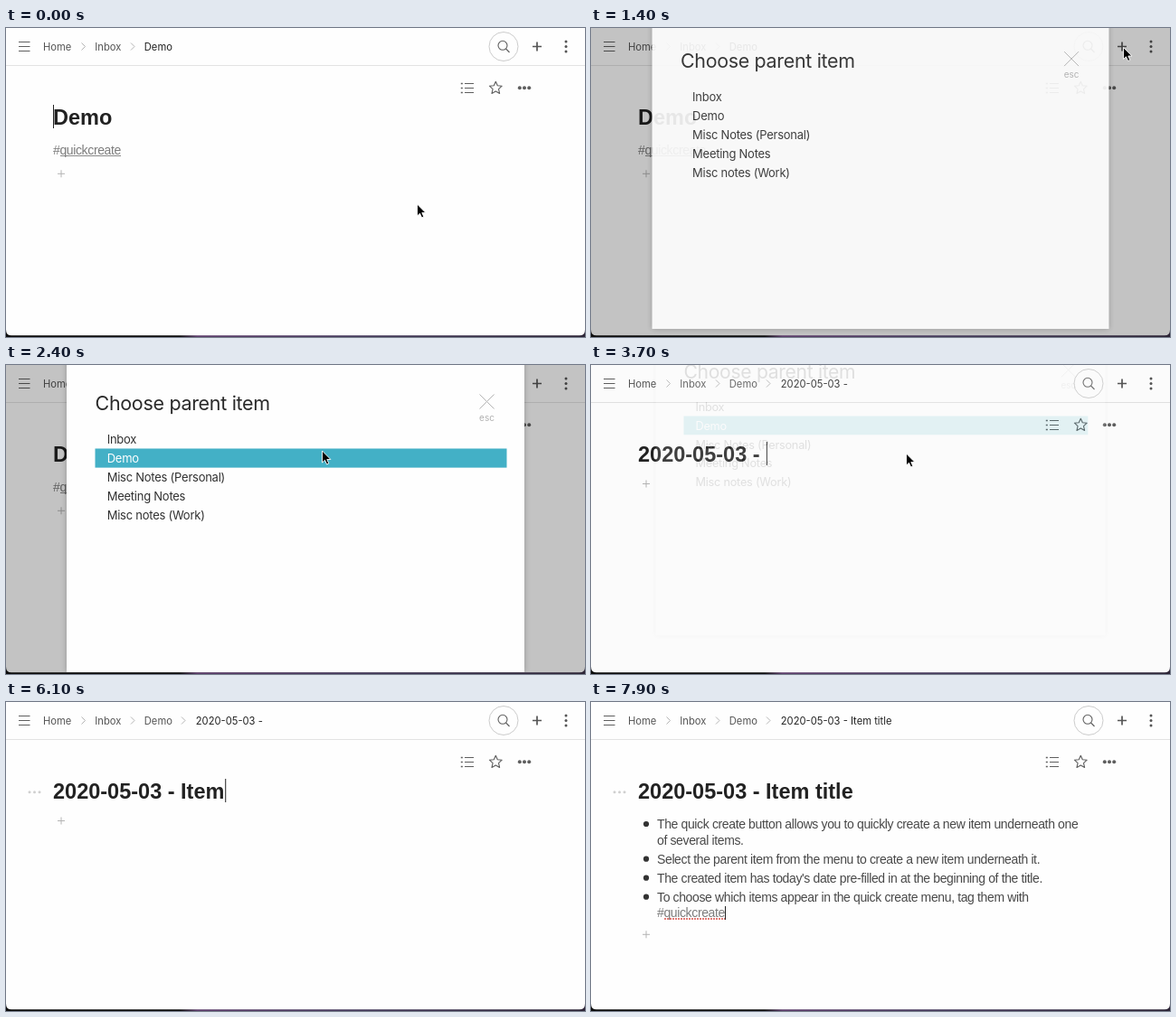
These frames come from a looping animation (640 px wide and 342 px high, 8000 ms). An HTML page:

```html
<!DOCTYPE html>
<html lang="en">
<head>
<meta charset="utf-8">
<title>Quick create</title>
<style>
  html, body { margin: 0; width: 100%; height: 100%; overflow: hidden; background: #fefefe; }
  svg { display: block; width: 640px; height: 342px; overflow: hidden; }
  text { white-space: pre; }
  .ui { font-family: Inter, Roboto, sans-serif; }
  .crumb { font-size: 11.2px; fill: #555; }
  .now { fill: #222; }
  .title { font: bold 23.5px "Liberation Sans", Arial, sans-serif; fill: #222; }
  .body { font: 14px "Liberation Sans", Arial, sans-serif; letter-spacing: -.37px; fill: #484848; }
  .tag { fill: #7c7c7c; }
  .head { font-size: 21.5px; letter-spacing: -.32px; fill: #2a2a2a; }
  .item { font-size: 13px; letter-spacing: -.25px; fill: #303030; }
  .line { fill: none; stroke: #5e5e5e; stroke-width: 1.1; }
  .soft { fill: none; stroke: #b4b4b4; stroke-width: 1; }
  .ring { fill: none; stroke: #ccc; stroke-width: 1; }
  .caret { stroke: #222; stroke-width: 1; }
</style>
</head>
<body>
<svg viewBox="0 0 640 342">
  <defs>
    <linearGradient id="dock">
      <stop offset=".3" stop-color="#0c0c0c"/>
      <stop offset=".33" stop-color="#5c3c6a"/>
      <stop offset=".6" stop-color="#453a5c"/>
      <stop offset="1" stop-color="#2c2436"/>
    </linearGradient>
    <filter id="blur" x="-5%" y="-5%" width="110%" height="110%"><feGaussianBlur stdDeviation="3"/></filter>
  </defs>
  <rect width="640" height="342" fill="#fefefe"/>

  <g id="bar" class="ui">
    <path class="line" d="M14 15.5H26.5M14 20.5H26.5M14 25.5H26.5"/>
    <text class="crumb" x="41" y="24.5">Home</text>
    <text class="crumb" x="98.3" y="24.5">Inbox</text>
    <text class="crumb" id="demoCrumb" x="152.8" y="24.5">Demo</text>
    <path class="soft" d="M83.5 16.5l4 4-4 4M138 16.5l4 4-4 4"/>
    <circle cx="550" cy="20.5" r="16" class="ring"/>
    <circle cx="549" cy="19.3" r="5" class="line"/>
    <path class="line" d="M552.6 23L556.5 27"/>
    <circle id="hover" cx="587.2" cy="20.5" r="15.7" fill="#dedede"/>
    <path d="M582 20.5h10M587 15.5v10" stroke="#555" stroke-width="1.7"/>
    <g id="kebab" fill="#555"></g>
    <path d="M0 41.5H640" stroke="#e2e2e2"/>
  </g>

  <g id="tools">
    <path class="line" d="M507 61.5h10M507 66.5h10M507 71.5h10"/>
    <path class="line" d="M502.8 61.5h2M502.8 66.5h2M502.8 71.5h2" style="stroke-width:1.6"/>
    <path id="star" class="line" stroke-linejoin="round"/>
    <g id="more" fill="#5e5e5e"></g>
  </g>

  <g id="demoPage">
    <text class="title" x="52" y="106.6">Demo</text>
    <text class="body tag" x="52" y="139.7">#quickcreate</text>
    <path d="M60 141.5H127" stroke="#888"/>
  </g>

  <g id="newPage">
    <path class="soft" d="M194 16.5l4 4-4 4"/>
    <text id="newCrumb" class="ui crumb now" x="209.8" y="24.5"></text>
    <g id="handle" fill="#d0d0d0"></g>
    <text id="newTitle" class="title" x="52" y="106.6"></text>
    <g id="notes"></g>
  </g>

  <path id="add" class="soft" d="M-4 0H4M0-4V4"/>
  <path id="caret" class="caret"/>

  <rect id="shade" width="640" height="342"/>
  <g id="modal" class="ui">
    <rect x="67" y="-12" width="506" height="352" opacity=".25" filter="url(#blur)"/>
    <rect x="67" y="-12" width="506" height="352" fill="#fefefe"/>
    <text class="head" x="98.5" y="50">Choose parent item</text>
    <path class="soft" d="M523.5 32.5l16 16M539.5 32.5l-16 16"/>
    <text x="531.5" y="61.5" text-anchor="middle" font-size="10" fill="#b0b0b0">esc</text>
    <rect id="pick" x="98.5" width="455" height="21.1" fill="#43b0c6"/>
    <g id="menu"></g>
  </g>

  <path d="M0 334Q0 340.3 6 340.3H634Q640 340.3 640 334V342H0Z" fill="url(#dock)"/>
  <path id="mouse" d="M0 0V13L3 10.3L5.1 15L7.3 14L5.3 9.5H9.4Z" fill="#000" stroke="#fff" stroke-width=".9"/>
</svg>
<script>
const LOOP = 8000, STEP = 100;
const $ = id => document.getElementById(id);
const svgNS = "http://www.w3.org/2000/svg";

function add(parent, tag, attrs, text = "") {
  const el = document.createElementNS(svgNS, tag);
  for (const key in attrs) el.setAttribute(key, attrs[key]);
  el.textContent = text;
  parent.append(el);
  return el;
}
const dots = (id, spots, r) => spots.forEach(([cx, cy]) => add($(id), "circle", { cx, cy, r }));
const show = (id, on) => { $(id).style.display = on ? "" : "none"; };

dots("kebab", [[619, 15], [619, 20.5], [619, 26]], 1.5);
dots("more", [[567.8, 66.3], [573, 66.3], [578.2, 66.3]], 2);
dots("handle", [[26, 99.7], [31.5, 99.7], [37, 99.7]], 1.5);

const starPoints = Array.from({ length: 10 }, (_, i) => {
  const r = i % 2 ? 3.4 : 7.3, a = (i / 5 - .5) * Math.PI;
  return [541.3 + r * Math.cos(a), 66.5 + r * Math.sin(a)].map(v => v.toFixed(1)).join(" ");
});
$("star").setAttribute("d", "M" + starPoints.join("L") + "Z");

const ROW = 21.1, ROW_TOP = 71.4;
const items = ["Inbox", "Demo", "Misc Notes (Personal)", "Meeting Notes", "Misc notes (Work)"]
  .map((name, i) => add($("menu"), "text", { class: "item", x: 111.7, y: ROW_TOP + ROW * i + 15.6 }, name));

// [centre of line, text, starts a bullet]
const lines = [
  [135.3, "The quick create button allows you to quickly create a new item underneath one", 1],
  [153, "of several items.", 0],
  [174, "Select the parent item from the menu to create a new item underneath it.", 1],
  [195, "The created item has today's date pre-filled in at the beginning of the title.", 1],
  [216, "To choose which items appear in the quick create menu, tag them with", 1]
];
for (const [y, text, bullet] of lines) {
  add($("notes"), "text", { class: "body", x: 73, y: y + 4.7 }, text);
  if (bullet) add($("notes"), "circle", { cx: 61, cy: y - .3, r: 3.1, fill: "#333" });
}
add($("notes"), "text", { class: "body tag", x: 73, y: 238.2 }, "#quickcreate");
add($("notes"), "path", { d: "M81 240H148", stroke: "#d8504a", "stroke-width": 1.6, "stroke-dasharray": "2 1" });

// Interpolates rows of [time, ...values], smoothly if asked.
function at(rows, t, smooth) {
  let i = rows.findIndex(row => row[0] > t);
  if (i < 0) i = rows.length;
  if (i === 0 || i === rows.length) return rows[Math.max(0, i - 1)].slice(1);
  const a = rows[i - 1], b = rows[i];
  let k = (t - a[0]) / (b[0] - a[0]);
  if (smooth) k = k * k * (3 - 2 * k);
  return a.slice(1).map((v, n) => v + (b[n + 1] - v) * k);
}

const mousePath = [
  [0, 454.5, 195], [300, 454.5, 195], [900, 588.5, 21.5],
  [1600, 588.5, 21.5], [2300, 349.5, 95], [2900, 349.5, 95], [3300, 348.5, 98]
];
// time, opacity, rise, scale
const modalPath = [
  [1200, 0, -45, .975], [1300, .5, -22, .988], [1400, .9, -6.3, .998], [1500, 1, 0, 1],
  [3600, 1, 0, 1], [3700, .13, -34.3, .982], [3800, 0, -45, .975]
];
const shadePath = [[1200, 0], [1300, .15], [1400, .23], [3600, .23], [3700, .01], [3800, 0]];

const DATE = "2020-05-03 - ", NAME = "Item title";
const OPENED = 3700, TYPING = 5800, SAVED = 7200, FILLED = 7500;

function setCaret(t, isNew, filled) {
  let x = 52.5, y = 85, h = 26, on = t < 500;
  if (isNew) {
    x = 53.3 + $("newTitle").getComputedTextLength();
    on = t >= TYPING && t < SAVED || (t - OPENED) % 1000 < 500;
  }
  if (filled) { x = 148.5; y = 226; h = 15; on = true; }
  $("caret").setAttribute("d", `M${x} ${y}v${h}`);
  show("caret", on);
}

function draw(t) {
  const isNew = t >= OPENED, filled = t >= FILLED;
  show("demoPage", !isNew);
  show("newPage", isNew);
  show("notes", filled);
  show("handle", t >= 3900);
  show("hover", t >= 900 && t < 1300);
  $("demoCrumb").classList.toggle("now", !isNew);

  const typed = Math.max(0, Math.floor((t - TYPING) / 100) + 1);
  $("newTitle").textContent = DATE + NAME.slice(0, typed);
  $("newCrumb").textContent = DATE + (t >= SAVED ? NAME : "");
  $("add").setAttribute("transform", `translate(61 ${filled ? 257.3 : isNew ? 131.5 : 161.3})`);
  setCaret(t, isNew, filled);

  const [mx, my] = at(mousePath, t, true);
  $("mouse").setAttribute("transform", `translate(${mx} ${my})`);
  show("mouse", t < TYPING);

  const [alpha, rise, scale] = at(modalPath, t);
  $("modal").setAttribute("opacity", alpha);
  $("modal").setAttribute("transform", `translate(${320 * (1 - scale)} ${rise}) scale(${scale})`);
  $("shade").setAttribute("opacity", at(shadePath, t)[0]);

  const row = mx > 98 && mx < 554 ? Math.floor((my - ROW_TOP) / ROW) : -1;
  show("pick", row >= 0);
  $("pick").setAttribute("y", ROW_TOP + ROW * row);
  items.forEach((el, i) => { el.style.fill = i === row ? "#fff" : ""; });
}

const start = performance.now();
function tick() {
  const t = (performance.now() - start) % LOOP;
  draw(Math.floor(t / STEP) * STEP);
  requestAnimationFrame(tick);
}
tick();
</script>
</body>
</html>
```
